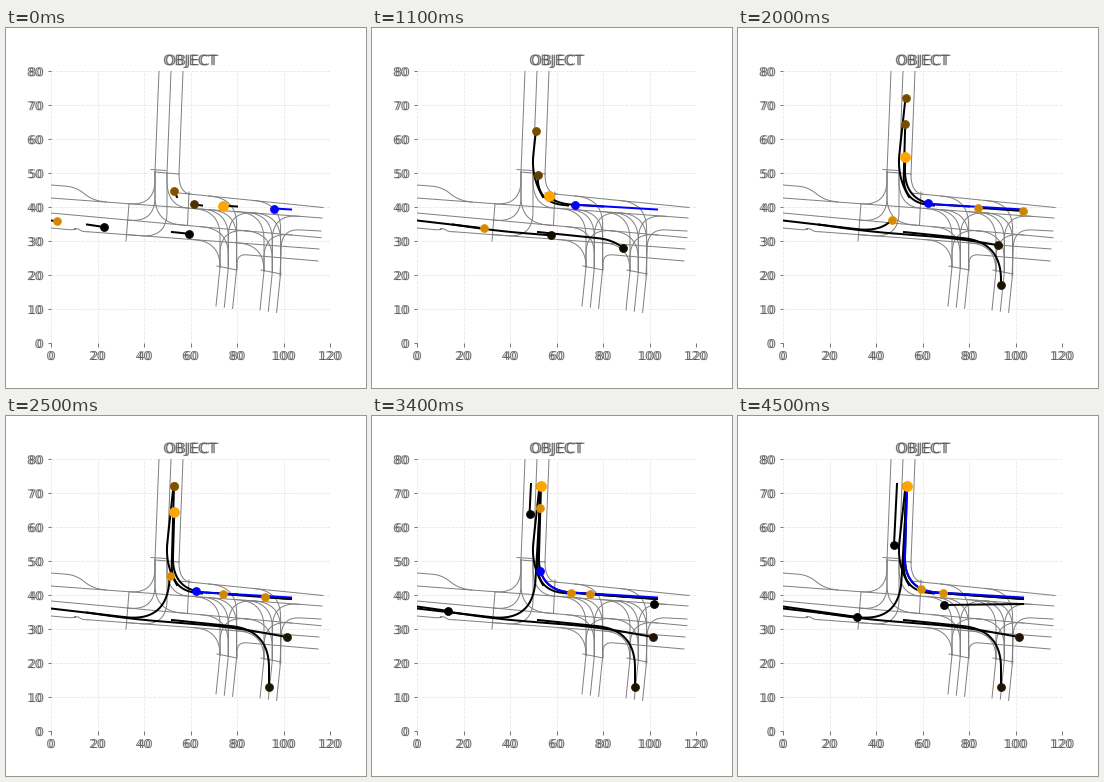
A matplotlib script that plays this animation: 360 by 360 pixels, repeating every 4.6 s.

```python
import numpy as np
import matplotlib.pyplot as plt
from matplotlib.animation import FuncAnimation
from matplotlib.patheffects import SimplePatchShadow

FRAMES, STEP = 46, 100
LEFT, BASE = 45, 315        # pixel position of the data origin
SX, SY = 2.325, 3.3975      # pixels per data unit
ORANGE = np.array([1.0, 0.647, 0.0])
INK = "#555555"

plt.rcParams["font.family"] = "DejaVu Sans"
fig = plt.figure(figsize=(5, 5), dpi=72, facecolor="white")
ax = fig.add_axes([0.125, 0.125, 0.775, 0.755])
ax.set(xlim=(0, 120), ylim=(0, 80), xticks=range(0, 121, 20), yticks=range(0, 81, 10))
ax.set_axisbelow(True)
ax.grid(color="#e6e6e6", ls="--", lw=0.8)
ax.tick_params(labelsize=12, color=INK, width=0.8)
ax.tick_params(axis="y", pad=4.5)
for spine in ax.spines.values():
    spine.set_visible(False)
title = ax.set_title("OBJECT", fontsize=14.4)

# The lettering is printed twice, slightly apart
double = [SimplePatchShadow(offset=(dx, 0), shadow_rgbFace=INK, alpha=0.8) for dx in (-1, 1)]
for text in [title, *ax.get_xticklabels(), *ax.get_yticklabels()]:
    text.set_path_effects(double)


def to_data(p):
    p = np.asarray(p, float)
    return (p[..., 0] - LEFT) / SX, (BASE - p[..., 1]) / SY


def rounded(points, r):
    """Polyline whose corners are replaced by quadratic curves of reach r."""
    p = np.array(points, float)
    u = np.linspace(0, 1, 24)[:, None]
    parts = [p[:1]]
    for a, b, c in zip(p, p[1:], p[2:]):
        la, lc = np.hypot(*(a - b)), np.hypot(*(c - b))
        start = b + (a - b) * min(r / la, 1)
        end = b + (c - b) * min(r / lc, 1)
        parts.append((1 - u) ** 2 * start + 2 * u * (1 - u) * b + u ** 2 * end)
    return np.vstack(parts + [p[-1:]])


def monotone(t, keys, vals):
    """Cubic interpolation without overshoot, held at both ends."""
    if t <= keys[0]:
        return vals[0]
    if t >= keys[-1]:
        return vals[-1]
    h = np.diff(keys)
    d = np.diff(vals) / h
    mid = 2 * d[:-1] * d[1:] / (d[:-1] + d[1:])
    m = np.concatenate([d[:1], mid, d[-1:]])
    k = np.searchsorted(keys, t, side="right") - 1
    u = (t - keys[k]) / h[k]
    return (vals[k] * (1 + 2 * u) * (1 - u) ** 2 + vals[k + 1] * u * u * (3 - 2 * u)
            + h[k] * u * (1 - u) * (m[k] * (1 - u) - m[k + 1] * u))


# Map: sloping lanes, upright arms, and turns that join them
def road(points, r=10):
    ax.plot(*to_data(rounded(points, r)), color="gray", lw=1, zorder=2)


def lane(y0, slope):
    return lambda x: y0 + slope * (x - LEFT)


def span(f, x0, x1):
    road([(x0, f(x0)), (x1, f(x1))])


def turn(tip, f, reach):
    x, y = tip
    road([tip, (x, f(x)), (x + reach, f(x + reach))], 26)


LANES = [lane(152.1, 0.1007), lane(170, 0.0738), lane(185, 0.0915), lane(201, 0.0746)]
span(LANES[0], 173, 317)
span(LANES[1], 45, 316)
span(LANES[2], 45, 315)
span(LANES[3], 82, 313)
road([(45, 157), (70, 159), (86, 172), (100, 174)])
road([(45, 200), (67, 202), (71, 200), (76, 203.5), (82, LANES[3](82))], 3)

north = [(149 + 12 * k, 144 + k) for k in range(3)]
for x, y in north:
    road([(x + 4, 43), (x, y)])
road([(145, 141.5), (160, 142.5)])
road([north[0], north[2]])
road([(123, 176), (120, 213)])
road([(183, 164), (181.5, 197)])
for arm, ln, reach in [(0, 1, -26), (0, 2, 34), (0, 2, -28),
                       (1, 3, -40), (1, 1, 22), (2, 0, 12)]:
    turn(north[arm], LANES[ln], reach)

SOUTH_TURNS = [(0, 3, -1), (0, 1, -1), (0, 2, 1), (1, 2, -1),
               (1, 1, 1), (1, 1, -1), (2, 1, -1), (2, 0, -1)]
for x0, y0 in [(210, 278), (254, 282)]:
    tips = [(x0 + 4 + 8.3 * k, y0 - 39 + 1.2 * k) for k in range(3)]
    for x, y in tips:
        road([(x - 4, y + 39), (x, y)])
    road([(x0 + 1, y0 - 40), (x0 + 21, y0 - 36)])
    for arm, ln, side in SOUTH_TURNS:
        turn(tips[arm], LANES[ln], 28 * side)
road([(231, 241), (231, 226), (312, 233)])
road([(274, 248), (276, 201), (315, 203)], 18)


class Car:
    """Runs along a path; keys are (seconds, share of the path travelled)."""

    def __init__(self, path, r, keys, glow=(0, 0), kind="other"):
        self.path = rounded(path, r)
        dist = np.cumsum(np.hypot(*np.diff(self.path, axis=0).T))
        self.share = np.concatenate([[0], dist / dist[-1]])
        self.keys, self.vals = np.array(keys, float).T
        self.glow = glow
        self.kind = kind
        color, size, z = {"other": ("black", 8, 6), "blue": ("blue", 8, 7),
                          "lead": (ORANGE, 10, 8)}[kind]
        blue = kind == "blue"
        self.trail, = ax.plot([], [], color="blue" if blue else "black", lw=2,
                              zorder=4 if blue else 3)
        self.dot, = ax.plot([], [], "o", color=color, ms=size, mew=0.7, zorder=z)

    def show(self, t):
        if t < self.keys[0]:
            self.trail.set_data([], [])
            self.dot.set_data([], [])
            return
        s = monotone(t, self.keys, self.vals)
        here = [np.interp(s, self.share, axis) for axis in self.path.T]
        self.trail.set_data(*to_data(np.vstack([self.path[self.share < s], here])))
        x, y = to_data(here)
        self.dot.set_data([x], [y])
        if self.kind == "other":
            w = np.interp(t, self.keys[[0, -1]], self.glow)
            self.dot.set_markerfacecolor(ORANGE * w)
            self.dot.set_markeredgecolor(ORANGE * min(1, 1.1 * w))


CORNER, TOP = (166, 174.5), (169, 70)
cars = [
    # eastbound, straight on and turning down
    Car([(81, 196.5), (125, 203), (225, 211), (281, 221)], 30,
        [(0, .084), (.5, .2), (1.6, .748), (2.3, 1)], (.02, .12)),
    Car([(166, 204), (263, 214), (263, 271)], 38,
        [(0, .12), (.5, .395), (1.6, .775), (2.3, 1)], (.03, .12)),
    Car([(45, 190.5), (119, 201)], 0, [(3.05, 0), (3.8, .784), (4.5, 1)]),
    # turning into the upper road
    Car([(45, 192.5), (161, 206), TOP], 42,
        [(0, .025), (.5, .178), (1.6, .375), (2.5, .62), (3.1, .813), (3.7, 1)], (.82, .85)),
    Car([(171, 169), (159, 148), (167.5, 70)], 22,
        [(0, .066), (.5, .31), (1.6, 1)], (.5, .45)),
    Car([(196, 177.5), (165, 174), (168, 70)], 26,
        [(0, .064), (.5, .165), (1.6, .61), (2.45, 1)], (.3, .5)),
    # followers
    Car([(285, 183), CORNER, TOP], 34,
        [(1.2, 0), (1.6, .104), (2.5, .32), (4.5, .487)], (.8, .85)),
    Car([(285, 183), CORNER, TOP], 34,
        [(2, 0), (2.5, .125), (3.1, .284), (3.8, .35), (4.5, .38)], (.8, .85)),
    # late arrivals
    Car([(159, 68), (156, 129)], 0, [(3, 0), (3.1, .1), (3.8, .88), (4.5, 1)]),
    Car([(285, 188), (206, 189)], 0, [(3.35, 0), (3.8, .39), (4.5, 1)]),
    Car([(285, 181.5), CORNER, TOP], 34,
        [(0, .08), (.5, .25), (1.6, .445), (2.5, .452), (3.1, .527), (3.8, .73), (4.45, 1)],
        kind="blue"),
    Car([(231, 178.5), CORNER, TOP], 34,
        [(0, .089), (.5, .229), (1.6, .476), (2.5, .835), (3.05, 1)], kind="lead"),
]


def update(i):
    for car in cars:
        car.show(i * STEP / 1000)
    return [part for car in cars for part in (car.trail, car.dot)]


anim = FuncAnimation(fig, update, frames=FRAMES, interval=STEP, repeat=True,
                     repeat_delay=0, blit=False)
plt.show()
```
